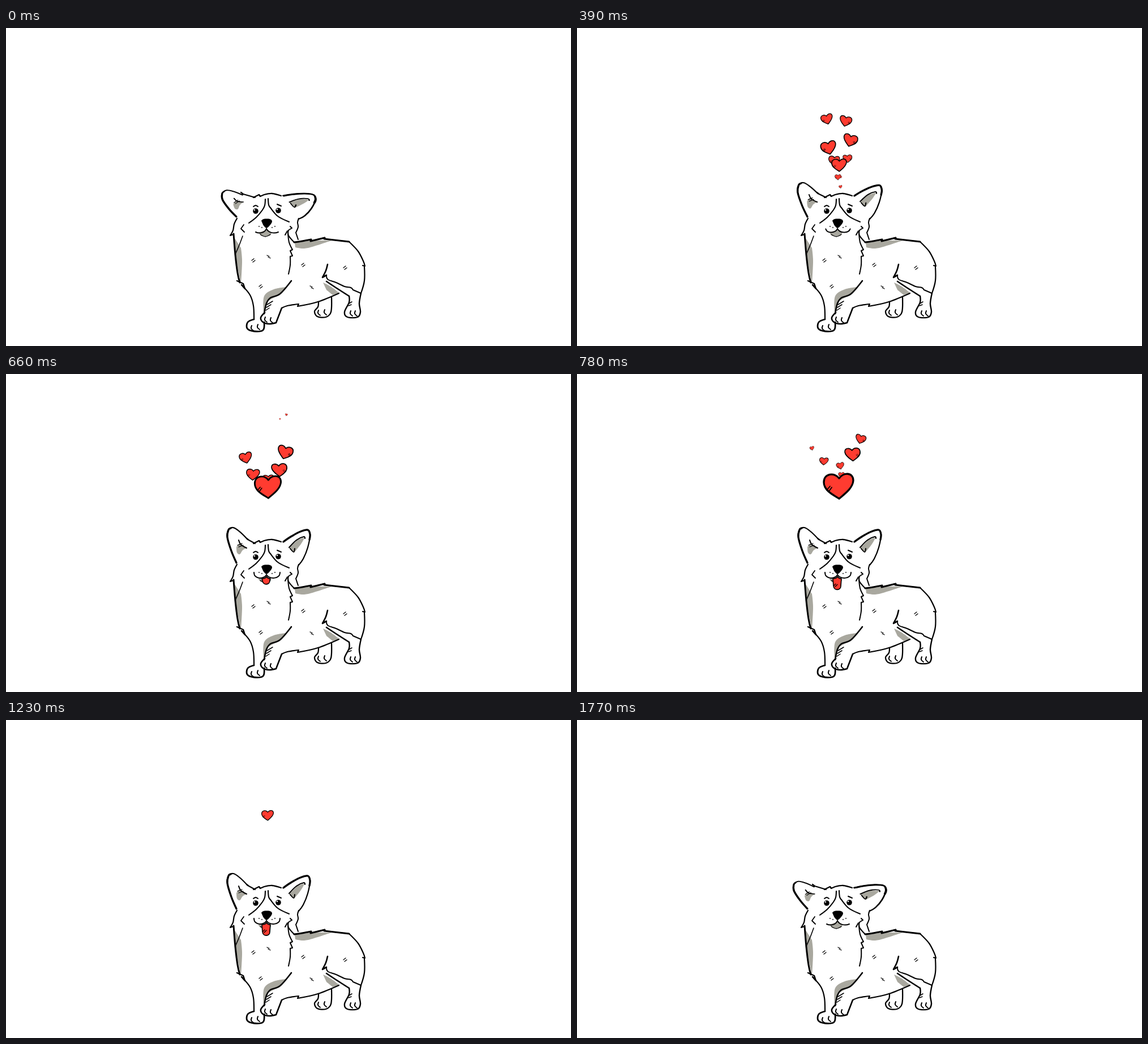
Write an HTML page that moves like this. It is 998 px wide and 561 px high and loops after 1.8 s.

```html
<!DOCTYPE html>
<html lang="en">
<head>
<meta charset="utf-8">
<title>Corgi with hearts</title>
<style>
html, body { margin: 0; width: 100%; height: 100%; overflow: hidden; background: #fff; }
svg { display: block; width: 100%; height: 100%; }
path { fill: none; stroke: #000; stroke-linecap: round; stroke-linejoin: round; }
.shade { fill: #a9a89f; stroke: none; }
.white { fill: #fff; stroke: none; }
.black { fill: #000; stroke: none; }
.red { fill: #ff3b30; }
</style>
</head>
<body>
<svg viewBox="0 0 998 561">
  <g id="hearts"></g>
  <g id="dog"></g>
</svg>
<script>
const LOOP = 1800, STEP = 30;
const NS = 'http://www.w3.org/2000/svg';
const dog = document.getElementById('dog');
const heartLayer = document.getElementById('hearts');

function add(parent, tag, attrs = {}) {
  const el = document.createElementNS(NS, tag);
  for (const key in attrs) el.setAttribute(key, attrs[key]);
  return parent.appendChild(el);
}
const clamp = v => Math.max(0, Math.min(1, v));
const lerp = (a, b, p) => a + (b - a) * p;
const smooth = p => p * p * (3 - 2 * p);

// Smooth curve through "x,y" points; "!" marks a sharp corner, "|" a new stroke.
function curve(text) {
  return text.split('|').map(stroke => {
    const pts = stroke.trim().split(/\s+/).map(word => {
      const [x, y] = word.replace('!', '').split(',').map(Number);
      return { x, y, sharp: word[0] === '!' };
    });
    const slope = (i, axis) =>
      !pts[i - 1] || !pts[i + 1] || pts[i].sharp ? 0 : (pts[i + 1][axis] - pts[i - 1][axis]) / 6;
    return pts.map((p, i) => {
      if (!i) return `M${p.x} ${p.y}`;
      const q = pts[i - 1];
      return `C${q.x + slope(i - 1, 'x')} ${q.y + slope(i - 1, 'y')} ` +
        `${p.x - slope(i, 'x')} ${p.y - slope(i, 'y')} ${p.x} ${p.y}`;
    }).join('');
  }).join('');
}
const line = (text, width = 2, parent = dog) =>
  add(parent, 'path', { d: curve(text), 'stroke-width': width });
const fill = (text, cls, parent = dog) => add(parent, 'path', { d: curve(text) + 'Z', class: cls });

// Head base hides the hearts while they emerge.
fill('!437,299 !456,294 !487,296 !515,340 !500,372 !420,372 !405,335', 'white');

// Ears bend by a matrix around their outer base.
function ear(x, y, bend, outline, shade, details, hatch, thick) {
  const el = add(dog, 'g');
  fill(outline, 'white', el);
  fill(shade, 'shade', el);
  line(outline, 2.2, el);
  line(thick, 3.3, el);
  line(details, 2, el);
  if (hatch) line(hatch, 1.3, el);
  return up => {
    const [a, b, c, d] = [1, 0, 0, 1].map((v, i) => lerp(bend[i], v, up));
    el.setAttribute('transform', `translate(${x} ${y}) matrix(${a} ${c} ${b} ${d} 0 0) translate(${-x} ${-y})`);
  };
}
const ears = [
  ear(407, 333, [.965, .202, -.318, .78],
    '407,333 398,312 391,288 393,275 402,271 414,279 427,292',
    '407,305 408,315 413,318 418,311 !425,307 !412,299',
    '411,293 415,301 425,307', '409,302 417,299|411,305 419,302',
    '407,333 398,312 391,288 393,275 397,272'),
  ear(517, 337, [1.178, -.117, .338, .777],
    '490,296 503,287 520,278 533,275 537,283 533,306 525,326 517,337',
    '!500,307 !509,315 514,309 521,300 !528,288 514,293',
    '500,306 513,293 526,287 528,290|502,308 508,314 510,308', '',
    '490,296 503,287 520,278 533,275 537,283 536,292')
];
const earLink = line('0,0', 2.2);

// Shades on the body
fill('404,371 404,396 !415,450 417,412 415,388', 'shade');
fill('!510,379 540,375 !575,375 541,386 525,389 !511,387', 'shade');
fill('!455,501 456,473 473,461 !495,457 !487,468 462,482', 'shade');
fill('!560,449 575,457 !589,468 !577,471 566,462', 'shade');

// Head and neck
line('437,299 !447,294 !449,297 !456,294 470,292 486,296', 2.3);
line('517,336 515,343 516,351 !512,361 516,373');
line('408,336 403,346 401,357 !396,366 402,364', 2.2);
line('402,363 405,400 409,432 413,449', 3);
line('418,367 412,383 405,399', 1.6);
line('408,446 !419,451 !422,460 416,453', 2.4);
line('502,350 !505,353 500,356|497,358 493,365|499,357 499,366 509,378');
line('498,361 500,378 !506,391 !502,393 !506,402 !502,403 502,418 499,434');
line('420,347 !415,354 421,360', 1.8);

// Back, rump and legs
line('509,378 523,376 !539,373 !538,376 !563,370 !562,372 606,377', 3);
line('607,378 622,394 631,411 !634,420 630,419|633,421 633,446 627,468', 2.2);
line('568,417 565,428 !559,440 566,436|566,447 581,457 606,473', 2.6);
line('566,438 569,444 583,449 598,456 609,458 !613,462 627,468');
line('416,453 431,471 437,490 438,514', 2.2);
line('438,514 427,519 426,530 438,535 454,533 456,519', 2.8);
line('504,446 484,469 467,476 460,486 456,504', 2.6);
line('457,502 450,511 454,519 465,522 !477,520 482,507 487,494', 2.6);
line('487,494 497,490 !517,487 !515,491 551,483 588,468', 2.2);
line('552,483 551,492 545,500 550,509 565,510 574,501 575,475', 2.3);
line('606,473 606,484 598,501 603,510 621,510 626,501 624,486 627,468', 2.4);

// Toes, leg hatching and fur: the same small strokes at several spots
for (const [x, y] of [[434, 525], [445, 523], [458, 510], [468, 511], [552, 498], [563, 497], [609, 499], [617, 499]])
  line(`${x},${y} ${x - 1},${y + 5} ${x + 3},${y + 9}`);
line('461,488 471,482|460,493 468,488|459,498 465,494|606,486 611,483|605,490 610,488', 1.5);
[[434, 410], [522, 418], [596, 423], [447, 456], [461, 401], [537, 455]].forEach(([x, y], i) => {
  const tilt = i > 3 ? 2 : -3;
  line(`${x},${y} ${x + 4},${y + tilt}|${x + 2},${y + 3} ${x + 6},${y + 3 + tilt}`, 1.3);
});

// Face
line('458,302 457,313 453,321 442,334 429,344|463,301 464,312 467,317 480,332 500,342', 2.1);
line('437,315 441,313 445,315|479,311 486,314');
for (const [x, y] of [[441, 323], [481, 322]]) {
  add(dog, 'circle', { cx: x, cy: y, r: 4.8 });
  add(dog, 'circle', { cx: x - 2, cy: y - 2, r: 1.2, fill: '#fff' });
}
for (const dx of [-14, -9, 9, 14])
  add(dog, 'circle', { cx: 461 + dx, cy: Math.abs(dx) > 9 ? 350 : 352, r: .9 });
const chin = fill('!446,361 !460,356 !469,361 465,367 451,367', 'shade');
line('449,364 458,368 467,364', 1.3);
const tongue = add(dog, 'path', { class: 'red', 'stroke-width': 1.7 });
const tongueLines = line('454,372 457,369|456,374 460,370', 1.3);
const mouth = line('0,0');
fill('451,340 455,337 466,337 470,341 467,347 460,353 454,347', 'black');

// Hearts rise from the head; each key is [x, y, width] at the matching time.
// A negative width mirrors the heart.
const KEY_TIMES = [240, 540, 780, 1020, 1250, 1420];
const hearts = [];
function heart(birth, death, turn, ...spots) {
  const keys = [[birth, 462, 304, 0]];
  spots.forEach((spot, i) => spot && keys.push([KEY_TIMES[i], ...spot]));
  const [prev, last] = keys.slice(-2);
  const reach = 1 + (death - last[0]) / (last[0] - prev[0]);
  keys.push([death, lerp(prev[1], last[1], reach), lerp(prev[2], last[2], reach), 0]);

  const el = add(heartLayer, 'g');
  add(el, 'path', {
    class: 'red', 'stroke-width': 3.3,
    d: 'M1 22C-8 16-26 8-26-7C-26-23-7-25 1-14C9-25 26-25 26-10C25 4 10 14 1 22Z'
  });
  line('-21,7 -15,0|-17,9 -12,2', 1.8, el);
  hearts.push({ el, turn, keys });
}
heart(30, 600, -12, [452, 196, 34], [431, 126, 9]);
heart(50, 690, 11, [463, 216, -22], [486, 113, -22]);
heart(80, 930, 13, [480.5, 235, -15], [485, 162, -37], [501, 115, -19]);
heart(110, 840, -11, [457, 258, 18], [432, 165, 38], [415, 131, 8]);
heart(170, 930, 5, [472, 267, 8], [436, 201, 32], [436, 154, 16]);
heart(190, 960, -5, [477, 264, -5], [479, 197, -28], [487, 142, -28]);
heart(330, 690, 0, null, [476, 161, 14]);
heart(330, 900, -9, null, [474, 220, 21], [465, 162, 14]);
heart(300, 870, 0, null, [459, 195, 30], [467, 178, 11]);
heart(210, 1450, 0, [463, 283, 12], [463, 201, 42], [462, 198, 54],
  [462, 192, 38], [462, 166, 20], [462, 128, 8]);

// Values between timed keys, or null outside them.
function sample(keys, t, ease = p => p) {
  const next = keys.findIndex(key => key[0] > t);
  if (next < 1) return null;
  const a = keys[next - 1], b = keys[next];
  const p = ease((t - a[0]) / (b[0] - a[0]));
  return a.map((v, i) => lerp(v, b[i], p));
}

function drawHeart({ el, turn, keys }, t) {
  const now = sample(keys, t);
  el.style.display = now ? '' : 'none';
  if (!now) return;
  const s = now[3] / 54;
  el.setAttribute('transform', `translate(${now[1]} ${now[2]}) rotate(${turn}) scale(${s} ${Math.abs(s)})`);
}

const TONGUE = [[480, 360], [540, 362], [780, 381], [1020, 374.5], [1260, 381], [1500, 376], [1680, 360]];

function drawMouth(t) {
  const smile = smooth(clamp((t - 240) / 280)) * (1 - smooth(clamp((t - 1560) / 180)));
  const y = lerp(360, 350, smile);
  mouth.setAttribute('d', `M${lerp(441, 438, smile)} ${y}C${lerp(447, 438, smile)} 363 457 362 460 354` +
    `C464 362 ${lerp(474, 484, smile)} 363 ${lerp(481, 484, smile)} ${y}`);
  chin.setAttribute('transform', `translate(${-smile} 0)`);

  const now = sample(TONGUE, t, smooth);
  const tip = now ? now[1] : 0;
  const side = Math.max(360, tip - 7);
  tongue.style.display = tip > 360.5 ? '' : 'none';
  tongueLines.style.display = tip > 372 ? '' : 'none';
  tongue.setAttribute('d', 'M452 361Q459 361 460 357Q462 361 467 361' +
    `L466 ${side}C466 ${tip + 1} 454 ${tip + 2} 453 ${side}Z`);
  tongueLines.setAttribute('transform', `translate(0 ${(tip - 379) * .6})`);
}

function draw(t) {
  const up = t < 1500 ? 1 - (1 - clamp(t / 800)) ** 3 : clamp((1800 - t) / 300);
  ears.forEach(pose => pose(up));
  earLink.setAttribute('d', `M${lerp(415, 425, up)} 290l4 3L440 299`);
  drawMouth(t);
  hearts.forEach(h => drawHeart(h, t));
}

const started = performance.now();
function tick() {
  const t = (performance.now() - started) % LOOP;
  draw(Math.floor(t / STEP) * STEP);
  requestAnimationFrame(tick);
}
tick();
</script>
</body>
</html>
```
